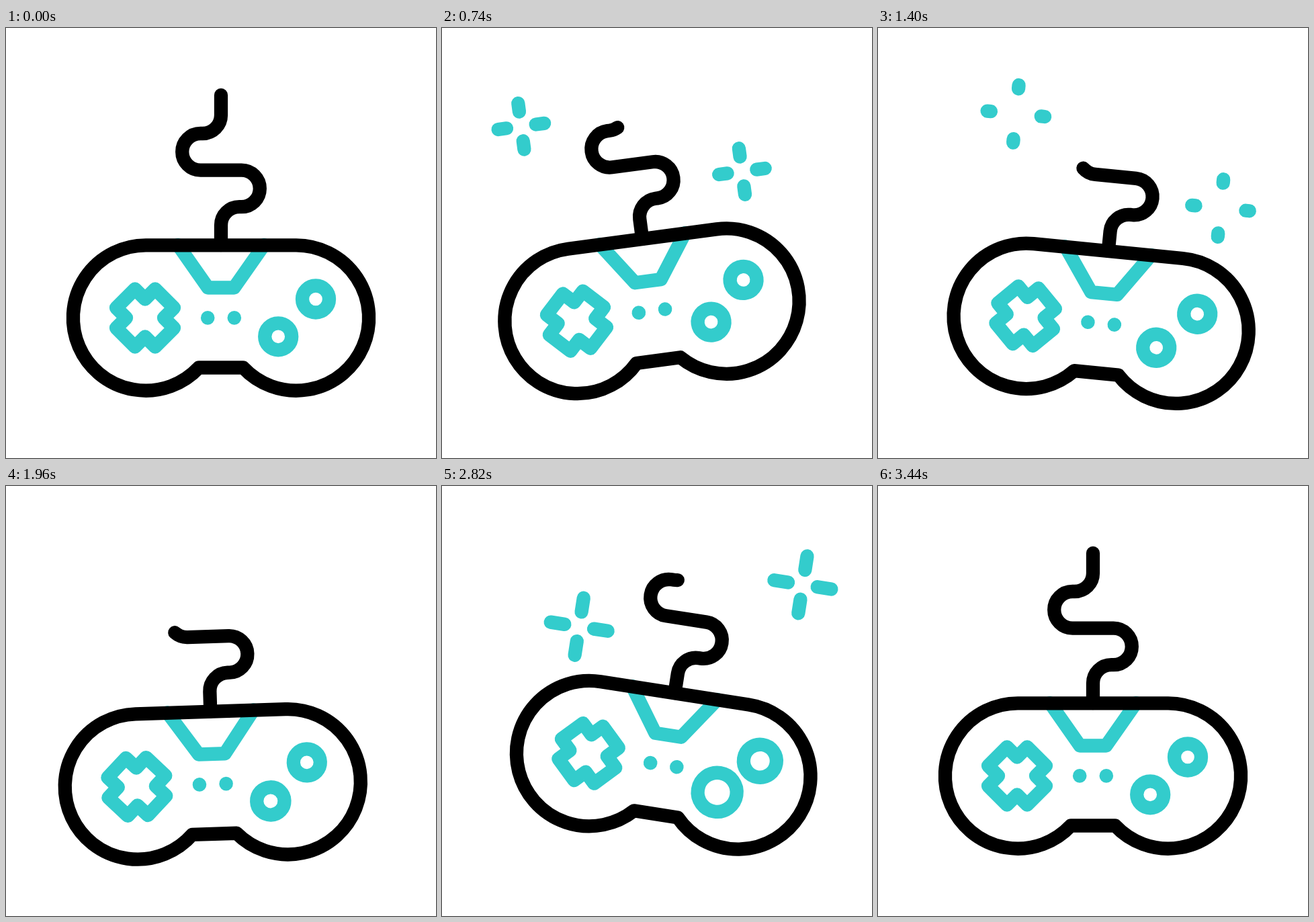
Animation of 640x640 px, one loop 3600 ms. Source, as an HTML page with a canvas:

```html
<!DOCTYPE html>
<html>
<head>
<meta charset="utf-8">
<style>
html, body { margin: 0; width: 100%; height: 100%; overflow: hidden; background: #fff; }
canvas { display: block; width: 640px; height: 640px; }
</style>
</head>
<body>
<canvas width="640" height="640"></canvas>
<script>
const ctx = document.querySelector('canvas').getContext('2d');
const TEAL = '#33cccc', BLACK = '#000';
const LOOP = 3600, STEP = 20, START = 200, END = 3440;
const BEAT = (END - START) / 5, LAG = 100;

const body = new Path2D('M208.5 323.3H431.5A108.2 108.2 0 1 1 353 505.5H287A108.2 108.2 0 1 1 208.5 323.3Z');
const notch = new Path2D('M256 323L300.5 386.5H339.5L384 323');
const pad = new Path2D('M192 388.5l15 15 15-15 28 28-15 15 15 15-28 28-15-15-15 15-28-28 15-15-15-15Z');
const cable = new Path2D('M320 323V293.5A27.3 27.3 0 0 1 347.3 266.2H350.5A27.3 27.3 0 0 0 350.5 211.6' +
  'H289.5A27.3 27.3 0 0 1 289.5 157H292.7A27.3 27.3 0 0 0 320 129.7V100');
const CABLE_LENGTH = 384, CABLE_CUT = .368;

const clamp = u => Math.min(1, Math.max(0, u));
const smooth = u => u * u * (3 - 2 * u);
const ramp = (t, from, to) => smooth(clamp((t - from) / (to - from)));

// Eases from pose to pose, one per beat; the last one is always reached at END.
function sway(t, start, poses) {
  let value = poses[0];
  for (let i = 1; i < poses.length; i++) {
    const from = start + (i - 1) * BEAT;
    value += (poses[i] - poses[i - 1]) * ramp(t, from, Math.min(from + BEAT, END));
  }
  return value;
}

// Ring radius that swells and shrinks once per beat.
function ringRadius(t, start, count) {
  const beats = (t - start) / BEAT;
  if (beats < 0 || beats > count) return 20;
  return 20 + 10 * smooth(1 - Math.abs(2 * (beats % 1) - 1));
}

function stroke(path, color) {
  ctx.strokeStyle = color;
  ctx.stroke(path);
}

function circle(x, y, r) {
  const path = new Path2D();
  path.arc(x, y, r, 0, Math.PI * 2);
  return path;
}

// Four rays shoot outwards, then vanish from the inside.
function drawSparkles(t, start, ...spots) {
  const middle = start + 600, end = middle + 600;
  if (t <= start || t >= end) return;
  const outer = 22 + 21 * ramp(t, start, middle);
  const inner = 22 + 21 * ramp(t, middle, end);
  const rays = new Path2D();
  for (const [x, y] of spots) {
    for (let i = 0; i < 4; i++) {
      const dx = Math.cos(i * Math.PI / 2), dy = Math.sin(i * Math.PI / 2);
      rays.moveTo(x + dx * inner, y + dy * inner);
      rays.lineTo(x + dx * outer, y + dy * outer);
    }
  }
  stroke(rays, TEAL);
}

function drawCable(t) {
  const cut = CABLE_CUT * (ramp(t, 200, 1400) - ramp(t, 2200, 3400));
  if (cut > 0) ctx.setLineDash([CABLE_LENGTH * (1 - cut), 1000]);
  stroke(cable, BLACK);
  ctx.setLineDash([]);
}

function draw(t) {
  const x = sway(t, START, [0, -24, 26, -26, 27, 0]);
  const y = sway(t, START, [0, -10, 10, 13, -15, 0]);
  const tilt = sway(t, START + LAG, [0, -10, 10, -10, 9.5, 0]);

  ctx.setTransform(1, 0, 0, 1, 0, 0);
  ctx.fillStyle = '#fff';
  ctx.fillRect(0, 0, 640, 640);
  ctx.translate(320 + x, 320 + y);
  ctx.rotate(tilt * Math.PI / 180);
  ctx.translate(-320, -320);
  ctx.lineWidth = 20.3;
  ctx.lineCap = ctx.lineJoin = 'round';

  drawSparkles(t, 400, [163.3, 133.4], [480.2, 243.2]);
  drawSparkles(t, 2200, [164.3, 247.2], [483.5, 134.5]);
  stroke(notch, TEAL);
  stroke(pad, TEAL);
  stroke(circle(405.2, 459.3, ringRadius(t, 1910, 2)), TEAL);
  stroke(circle(461, 403.5, ringRadius(t, 2669, 1)), TEAL);
  ctx.fillStyle = TEAL;
  ctx.fill(circle(300.2, 431.4, 10.3));
  ctx.fill(circle(339.8, 431.4, 10.3));
  stroke(body, BLACK);
  drawCable(t);
}

const begin = performance.now();
function tick() {
  const t = (performance.now() - begin) % LOOP;
  draw(Math.floor(t / STEP) * STEP);
  requestAnimationFrame(tick);
}
tick();
</script>
</body>
</html>
```
